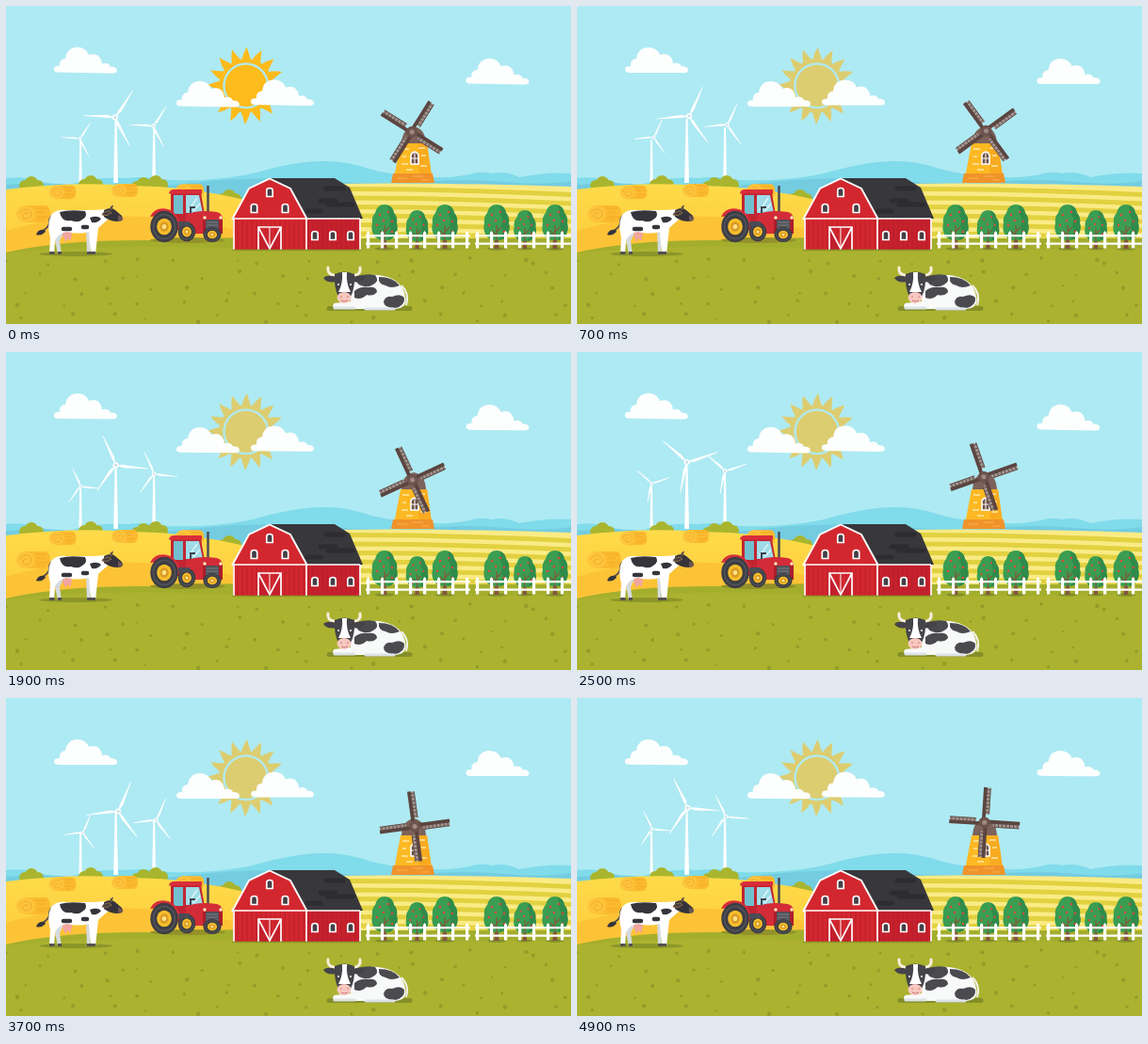
Animation of 600 by 338 pixels, one loop 5 s. Source, as an HTML page:

```html
<!DOCTYPE html>
<html lang="en">
<head>
<meta charset="utf-8">
<title>Farm</title>
<style>
html, body { margin: 0; width: 100%; height: 100%; overflow: hidden; background: #aeeaf3; }
svg { display: block; width: 100vw; height: 100vh; }
</style>
</head>
<body>
<svg viewBox="0 0 600 338" preserveAspectRatio="none">
  <defs>
    <linearGradient id="wheat" x2="0" y2="1"><stop offset="0" stop-color="#fedb4a"/><stop offset="1" stop-color="#fdcb3a"/></linearGradient>
    <clipPath id="farClip"><path d="M300 190Q420 186 600 192V262H300Z"/></clipPath>
    <path id="cloud" fill="#fdfefe" d="M5 27Q0 27 0 23.500Q0 20 6 20Q5 13 12 12Q13 1 24 0Q34 0 37 8Q45 5 49 11Q51 14 51 17Q58 15 60 20Q67 20 67 24Q67 27 62 27Z"/>
    <g id="bush" fill="#a9b52e"><circle cx="-7" cy="0" r="6"/><circle cx="0" cy="-3" r="7"/><circle cx="7" cy="0" r="6"/></g>
    <g id="bale">
      <path d="M-9 -9H12Q18 -9 18 0Q18 8 12 9H-9Z" fill="#fbba2f"/>
      <path d="M2 -6H15M4 -2H12M3 3H16M5 6H11" stroke="#f3a92b" fill="none"/>
      <ellipse cx="-8" cy="0" rx="10" ry="9" fill="#fdc43c"/>
      <path d="M-14 0a6 5 0 1 1 6 5a4 3 0 1 1 2 -6" stroke="#f3a92b" fill="none"/>
    </g>
    <g id="tree">
      <ellipse cy="27" rx="10" ry="1.800" fill="#83902a"/>
      <path d="M-1.700 10H1.700L2.500 27H-2.500Z" fill="#85563b"/>
      <path d="M0 -20Q8 -20 10 -11Q14 -7 13 0Q15 7 11 13Q8 18 0 18Q-8 18 -11 13Q-15 7 -13 0Q-14 -7 -10 -11Q-8 -20 0 -20Z" fill="#3a9d51"/>
      <path d="M3 -19Q9 -18 10 -11Q14 -7 13 0Q15 7 11 13Q9 17 3 18Q8 10 5 2Q8 -4 4 -9Q5 -14 3 -19Z" fill="#2f8b4b"/>
      <path d="M0 18V2M0 9L5 4M0 13L-5 8" stroke="#85563b" stroke-width="1.300" fill="none"/>
      <g fill="#dd4a3e"><circle cx="-5" cy="-9" r="1.300"/><circle cx="4" cy="-12" r="1.300"/><circle cx="8" cy="-2" r="1.300"/><circle cx="-8" cy="2" r="1.300"/><circle cx="-1" cy="-3" r="1.300"/><circle cx="8" cy="9" r="1.300"/><circle cx="-6" cy="13" r="1.300"/></g>
    </g>
    <path id="pane" d="M-3.200 4.500V-2Q-3.200 -4.500 0 -4.500T3.200 -2V4.500Z" fill="#443f46" stroke="#fff" stroke-width="1.700"/>
    <g id="wheel">
      <circle r="16" fill="#3c3d43"/><circle r="12.500" fill="none" stroke="#505159" stroke-width="2"/>
      <circle r="8.500" fill="#f7bd2d"/><circle r="5" fill="#d99a23"/><circle r="2.500" fill="#ffe08a"/>
    </g>
  </defs>

  <rect width="600" height="338" fill="#aeeaf3"/>
  <g id="sun"></g>
  <g id="clouds"></g>

  <path d="M0 183Q18 181 32 185Q50 191 70 189Q100 181 128 183Q150 180 172 185Q220 187 262 178Q310 164 340 165Q362 165 385 173Q410 180 440 181Q470 184 492 179Q505 175 515 178Q530 175 545 182Q575 176 600 178V215H0Z" fill="#80dbea"/>
  <path d="M0 190Q40 186 80 191T180 190Q260 180 330 185Q390 191 440 187T530 187T600 186V215H0Z" fill="#74cce1"/>

  <g id="turbines"></g>

  <use href="#bush" x="27" y="191"/><use href="#bush" x="90" y="190"/>
  <use href="#bush" x="146" y="192"/><use href="#bush" x="159" y="190"/><use href="#bush" x="237" y="205"/>
  <path d="M0 195Q70 186 135 191Q200 192 262 208V265H0Z" fill="url(#wheat)"/>
  <path d="M0 239Q65 219 160 225Q210 228 255 241V265H0Z" fill="#fdc337"/>
  <use href="#bale" x="29" y="221"/>
  <use href="#bale" transform="translate(60 198) scale(.8)"/>
  <use href="#bale" transform="translate(126 196) scale(.78)"/>
  <use href="#bale" transform="translate(195 197) scale(.85)"/>

  <g clip-path="url(#farClip)"><rect x="300" y="180" width="300" height="90" fill="#fbeb86"/><g id="rows" fill="none" stroke="#e2d140" stroke-width="5"></g></g>

  <path d="M0 262Q60 248 150 249Q260 244 380 247H600V338H0Z" fill="#a4ae2d"/>
  <path d="M0 263Q90 253 220 257Q400 262 600 257V338H0Z" fill="#abb22f"/>
  <g id="dots" fill="#929c28"></g>

  <g id="trees"></g>
  <g id="fence" fill="#fff"></g>

  <g id="tower">
    <path d="M419 146H447L453 188H411Z" fill="#fdb923"/>
    <path d="M437 146H447L453 188H439Z" fill="#f9ab20"/>
    <path d="M421 152H428M420 168H427M438 151H445M440 170H447M425 174H432M421 160H425M441 159H446" stroke="#ffe7a4" stroke-width="1.500"/>
    <path d="M411 178H453L455 188H409Z" fill="#f0932a"/>
    <path d="M415 183H426M432 181H443M441 185H449" stroke="#f9b151"/>
    <path d="M420 146Q421 130 433 128Q445 130 446 146Z" fill="#7d625b"/>
    <path d="M430 168V158Q434 152 438 158V168Z" fill="#705148" stroke="#fff" stroke-width="1.600"/>
    <path d="M434 156V168M430 162H438" stroke="#fff"/>
  </g>
  <g id="mill"></g>

  <g id="barn">
    <path d="M280 183H349L365 193L379 226H319L302 194Z" fill="#38373b"/>
    <path d="M340 194H358M334 207H350M342 211H368M320 218H334" stroke="#2c2c31" stroke-width="5" stroke-linecap="round"/>
    <path d="M241 259V226L258 194L280 183L302 194L319 226V259Z" fill="#d3272f"/>
    <rect x="319" y="226" width="57" height="33" fill="#c6212d"/>
    <g id="planks" stroke="#b01e2a" stroke-width=".7"></g>
    <path d="M241 226H376M242 226V259M319 226V259M376 226V259" stroke="#fff" stroke-width="1.700"/>
    <path d="M240 227L258 194L280 183.500L302 194L320 227" fill="none" stroke="#fff" stroke-width="1.900"/>
    <use href="#pane" x="280" y="198"/><use href="#pane" x="263.500" y="215"/><use href="#pane" x="296.500" y="215"/>
    <use href="#pane" x="328" y="244"/><use href="#pane" x="347" y="244"/><use href="#pane" x="366" y="244"/>
    <path d="M268 259V235H292V259M268 235L280 258L292 235" fill="#c31f2c" stroke="#fff" stroke-width="1.700"/>
    <path d="M280 236V259" stroke="#fff"/>
    <path d="M240 259.500H377" stroke="#8b9629" stroke-width="1.500"/>
  </g>

  <g id="tractor">
    <ellipse cx="193" cy="249" rx="40" ry="3" fill="#939129"/>
    <path d="M214.500 219V191" stroke="#4a4d56" stroke-width="2.500"/>
    <path d="M175 199H207L211 222V238H175Z" fill="#c22431"/>
    <path d="M178 201H188V221H178Z" fill="#72bfd0"/>
    <path d="M191 201H205L209 220H191Z" fill="#9fdce8"/>
    <path d="M194 217L203 204M199 218L206 210" stroke="#dcf4f7" stroke-width="1.500"/>
    <path d="M196 221V214H201" fill="none" stroke="#3d4452" stroke-width="2"/>
    <path d="M173 199Q174 195 178 195H208V199.500H173Z" fill="#d82e3a"/>
    <path d="M191 222Q203 216 224 219Q230 221 230 227V242H191Z" fill="#d32c38"/>
    <path d="M209 227H230V242H209Z" fill="#ad1d2b"/>
    <rect x="212" y="227" width="14" height="11" rx="1" fill="#505159"/>
    <path d="M213 230H225M213 233H225M213 236H225" stroke="#80838a"/>
    <circle cx="211" cy="225" r="1.700" fill="#fff1c0"/><circle cx="228" cy="225" r="1.700" fill="#fff1c0"/>
    <path d="M153 224Q158 213 172 216Q183 219 186 236L177 238Q176 224 164 223Z" fill="#d82e3a"/>
    <use href="#wheel" transform="translate(168 234.500) scale(.92 1.04)"/>
    <use href="#wheel" transform="translate(192 240) scale(.58 .64)"/>
    <use href="#wheel" transform="translate(219 243) scale(.6 .5)"/>
    <path d="M183 229H195V234H183Z" fill="#4a4d56"/>
  </g>

  <g id="standing">
    <ellipse cx="74" cy="263.500" rx="39" ry="2.500" fill="#8b9529"/>
    <path d="M54 220Q45 222 46 231Q45 236 37 240" fill="none" stroke="#54504e" stroke-width="1.700"/>
    <path d="M41 238Q34 237 32 243Q37 245 42 240Z" fill="#35353b"/>
    <path d="M56 239H62L57 250L59 264H55L52 249ZM85 237H90L89 264H86Z" fill="#d5dbdf"/>
    <circle cx="65" cy="243" r="5" fill="#f0a5a0"/><path d="M63 246V250M68 246V249" stroke="#f0a5a0" stroke-width="2"/>
    <path d="M48 222Q53 216 64 217H88Q97 217 105 216L112 224Q103 231 98 236L95 264H90L88 240Q76 243 65 240Q56 241 52 249L51 264H46L47 246Q43 232 48 222Z" fill="#fff"/>
    <path d="M46 261H51.500V264H46ZM55 261H59V264H55ZM86 261H95V264H86Z" fill="#55504f"/>
    <path d="M57 219Q67 216 84 218Q87 224 81 227Q77 231 69 228Q59 230 57 219Z" fill="#35353b"/>
    <path d="M89 225Q97 222 101 226Q98 231 91 230Z" fill="#35353b"/>
    <path d="M61 237H68M82 235H86" stroke="#35353b" stroke-width="4.500" stroke-linecap="round"/>
    <path d="M104 217Q112 213 116 217L123 223Q125 228 119 229Q110 229 104 224Z" fill="#36343a"/>
    <path d="M119 222L124 225Q125 229 119 229Z" fill="#6c5654"/>
    <path d="M110 218Q103 218 102 222Q107 224 112 220ZM112 217Q109 213 114 212" fill="#463d3d" stroke="#8e6d52"/>
  </g>

  <g id="lying">
    <path d="M343 321.500H429" stroke="#858f29" stroke-width="5" stroke-linecap="round"/>
    <path d="M420 297Q429 306 425 318" fill="none" stroke="#f2f2f0" stroke-width="2"/>
    <path d="M365 293Q381 283 401 287Q421 291 424 309Q427 321 413 322H351Q345 321 348 316L366 314Z" fill="#f8f9f9"/>
    <path d="M373 287Q383 284 392 286Q397 292 390 296Q384 300 377 297Q371 296 373 287ZM396 288Q411 288 418 297Q409 301 403 297Q395 296 396 288ZM370 303Q376 298 384 299Q394 298 394 304Q390 309 383 307Q377 313 370 310ZM401 314Q403 308 410 309Q419 305 423 310Q424 319 413 321Q401 321 401 314Z" fill="#4a4a4f"/>
    <path d="M382 322H412M349 321H370" stroke="#dde2e5" stroke-width="3" stroke-linecap="round"/>
    <path d="M348 286Q341 285 342 278M371 286Q377 285 376 278" fill="none" stroke="#f7efdc" stroke-width="3" stroke-linecap="round"/>
    <path d="M350 288Q341 285 337 289Q341 295 350 293ZM369 288Q378 285 382 289Q377 295 369 293Z" fill="#45434a"/>
    <path d="M349 285Q359 280 370 285Q371 299 366 309Q359 315 353 309Q348 299 349 285Z" fill="#454449"/>
    <path d="M357 283H362Q361 295 366 304H353Q358 295 357 283Z" fill="#fff"/>
    <circle cx="353" cy="296" r="1" fill="#fff"/><circle cx="366" cy="296" r="1" fill="#fff"/>
    <ellipse cx="359" cy="310" rx="7.500" ry="6" fill="#f8c8bf"/>
    <path d="M356 308V310M363 308V310M356 313Q359 315 363 313" fill="none" stroke="#c87878"/>
  </g>
</svg>
<script>
const $ = id => document.getElementById(id);
const range = n => [...Array(n).keys()];
const fill = (id, items, draw) => { $(id).innerHTML = items.map(draw).join(''); };

const STEP = 100, STEPS = 50, TURN = 15.95;

// Scenery built from short rules
const rays = range(16).map(i =>
  `<path d="M-4.800 -27Q-3 -35 1 -41Q3 -34 5.500 -27Z" transform="rotate(${i * 22.5})"/>`).join('');
$('sun').innerHTML = `<g transform="translate(254.800 84.800)" fill="#fdbb1c">${rays}
  <circle r="26.500" fill="none" stroke="#fdbb1c" stroke-width="4"/><circle r="22.200"/></g>`;

const clouds = [[51, 44], [181, 80], [260, 78.500], [488.500, 56]];
fill('clouds', clouds, () => '<use href="#cloud"/>');

fill('rows', range(7), i => {
  const y = 198 + i * 9.500;
  return `<path d="M300 ${y - 3}Q450 ${y - 5} 610 ${y + 3}"/>`;
});

let seed = 11;
const rnd = () => (seed = seed * 16807 % 2147483647) / 2147483647;
fill('dots', range(70), i => {
  const x = (i % 14) * 43 + rnd() * 38, y = 267 + Math.floor(i / 14) * 15 + rnd() * 9;
  return `<circle cx="${x}" cy="${y}" r="${1.100 + rnd() * 1.200}"/>`;
});

// Each row of trees has a smaller one in the middle
fill('trees', [402, 436.500, 466, 521, 551, 583], (x, i) => {
  const s = i % 3 === 1 ? .87 : 1;
  return `<use href="#tree" transform="translate(${x} ${258 - 27 * s}) scale(${s})"/>`;
});
const post = x => `<path d="M${x} 257.500V241l1.600 -2l1.600 2V257.500Z"/>`;
fill('fence', [382, 498], x => range(8).map(i => post(x + 1 + i * 15)).join('') +
  `<path d="M${x} 243h111v2.200h-111ZM${x} 251.500h111v2.200h-111Z"/>`);
fill('planks', range(27), i => {
  const x = 246 + i * 5;
  return `<path d="M${x} 228V259"/>`;
});

// Rotors: their hub sits slightly off the pivot
const turbines = [[118, 118.700, 34, 116.500, 188], [80.500, 141.300, 20.500, 79, 187], [158.500, 128, 25, 157, 186]];
fill('turbines', turbines, ([x, y, len, px, base]) => {
  const w = len / 16;
  const blade = a => `<path d="M0 0L${w} ${-len * .25}L.4 ${-len}H-.2L${-w * .5} ${-len * .2}Z" transform="rotate(${a})"/>`;
  return `<path d="M${px - .8} ${y + 1}H${px + 1}L${px + w + .4} ${base}H${px - w - .2}Z" fill="#fff"/>
    <g class="rotor" fill="#fff"><g transform="translate(-1.900 .8)">${[0, 120, 240].map(blade).join('')}
    <circle r="${len / 11}"/><circle r="${len / 22}" fill="#c9dce4"/></g></g>`;
});

const slats = range(7).map(i => `M0 ${-11 - i * 4}H4`).join('');
const sail = a => `<g transform="rotate(${a})">
  <path d="M0 -9H4.500V-37H0Z" fill="#a1938e"/>
  <path d="${slats}M4.300 -9V-37" fill="none" stroke="#604b46" stroke-width=".9"/>
  <path d="M-3 0H.8V-37.500H-3Z" fill="#5b4540"/></g>`;
$('mill').innerHTML = `<g transform="translate(-2.100 .600)">${[0, 90, 180, 270].map(sail).join('')}
  <circle r="6" fill="#6d534d"/><circle r="2.500" fill="#a08a82"/></g>`;

const cloudEls = [...$('clouds').children];
const rotors = [...document.querySelectorAll('.rotor')];

function draw(n) {
  const turn = n * TURN;
  rotors.forEach((el, i) => {
    const [x, y] = turbines[i];
    el.setAttribute('transform', `translate(${x} ${y}) rotate(${33 + turn})`);
  });
  $('mill').setAttribute('transform', `translate(433.200 134.500) rotate(${32 + turn})`);
  $('sun').setAttribute('opacity', n % 3 ? .6 : 1);
  cloudEls.forEach((el, i) => {
    const tilt = 1 + .8 * Math.sin(n * Math.PI / 5);
    el.setAttribute('transform', `translate(${clouds[i]}) rotate(${tilt} 33 14)`);
  });
}

const start = performance.now();
function tick(now) {
  draw(Math.floor(Math.max(0, now - start) / STEP) % STEPS);
  requestAnimationFrame(tick);
}
draw(0);
requestAnimationFrame(tick);
</script>
</body>
</html>
```
